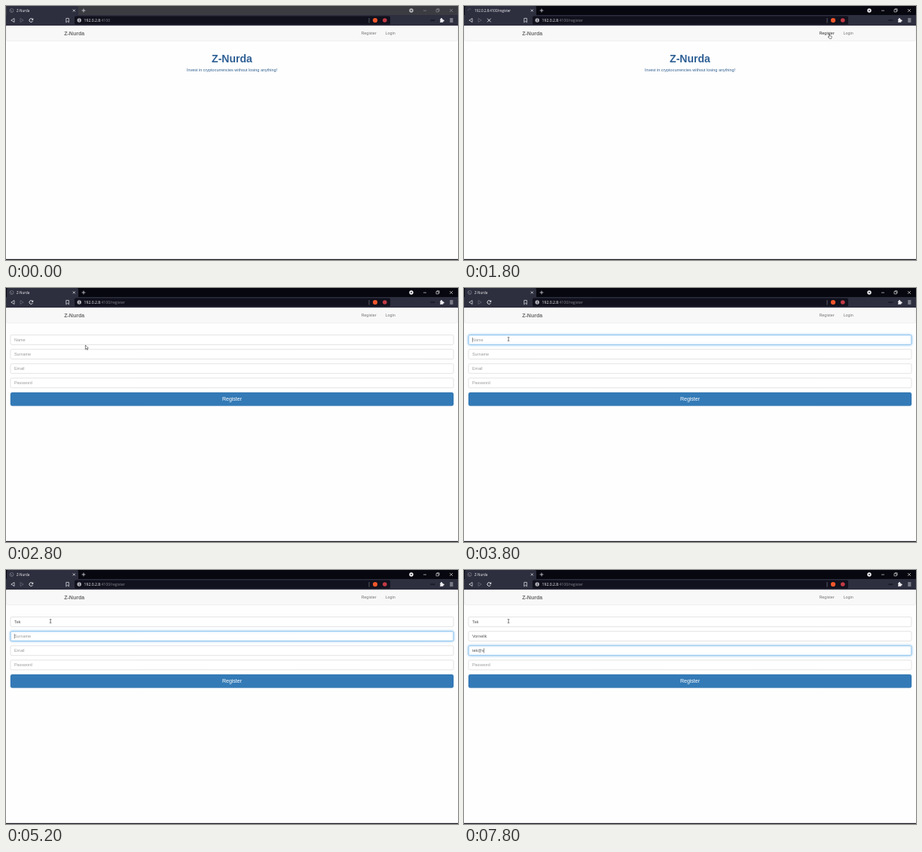
Animation of 600 by 338 pixels, one loop 8000 ms. Source, as an HTML page with a canvas:

```html
<!DOCTYPE html>
<html lang="en">
<head>
<meta charset="utf-8">
<title>Registration walkthrough</title>
<style>
html, body { margin: 0; width: 100%; height: 100%; overflow: hidden; background: #fefefe; }
canvas { display: block; width: 100vw; height: 100vh; }
</style>
</head>
<body>
<canvas id="stage" width="600" height="338"></canvas>
<script>
const ctx = document.getElementById('stage').getContext('2d');
const LOOP = 8000, TICK = 200, TAU = Math.PI * 2;
const ZOOM = 600 / 1536;
const PAGE = '"Liberation Sans", Arial, sans-serif';
const UI = '"Open Sans", "Noto Sans", sans-serif';
const BRAND = 'Z-Nurda', HOST = '192.0.2.8', PORT = ':4100', PATH = '/register';

const FIELDS = [
  { hint: 'Name', word: 'Tek', from: 4600, to: 5000, focus: 3600, blur: 5200 },
  { hint: 'Surname', word: 'Vornelik', from: 5800, to: 6800, focus: 5200, blur: 7000 },
  { hint: 'Email', word: 'tek@v', from: 7400, to: 7800, focus: 7000, blur: LOOP },
  { hint: 'Password', word: '', from: LOOP, to: LOOP + 1, focus: LOOP, blur: LOOP }
];

// time, x, y of the pointer's hot spot, shape
const POINTER = [
  [200, 497, 62, 'arrow'], [400, 484.6, 37.4, 'hand'], [2200, 410, 52, 'arrow'],
  [2400, 250, 70, 'arrow'], [2600, 140, 77, 'arrow'], [2800, 105.4, 76, 'arrow'],
  [3000, 82, 71, 'beam'], [3200, 65, 68.5, 'beam'], [3400, 59, 68, 'beam']
];

function text(str, x, y, size, color, font = PAGE, weight = 400, align = 'left') {
  ctx.font = `${weight} ${size}px ${font}`;
  ctx.textAlign = align;
  ctx.fillStyle = color;
  ctx.fillText(str, x, y);
  return ctx.measureText(str).width;
}

function rect(x, y, w, h, color) {
  ctx.fillStyle = color;
  ctx.fillRect(x, y, w, h);
}

function box(x, y, w, h, r, fill, stroke, width = ZOOM) {
  ctx.beginPath();
  ctx.roundRect(x, y, w, h, r);
  if (fill) { ctx.fillStyle = fill; ctx.fill(); }
  if (stroke) { ctx.strokeStyle = stroke; ctx.lineWidth = width; ctx.stroke(); }
}

function poly(points, { fill, stroke, width = 0.7, close = false }) {
  ctx.beginPath();
  points.forEach(([x, y]) => ctx.lineTo(x, y));
  if (close) ctx.closePath();
  if (fill) { ctx.fillStyle = fill; ctx.fill(); }
  if (stroke) { ctx.strokeStyle = stroke; ctx.lineWidth = width; ctx.stroke(); }
}

function disc(x, y, r, color) {
  ctx.beginPath();
  ctx.arc(x, y, r, 0, TAU);
  ctx.fillStyle = color;
  ctx.fill();
}

function arc(x, y, r, color, width = 0.7, from = 0, to = TAU) {
  ctx.beginPath();
  ctx.arc(x, y, r, from, to);
  ctx.strokeStyle = color;
  ctx.lineWidth = width;
  ctx.stroke();
}

function cross(x, y, r, color, width = 0.8) {
  poly([[x - r, y - r], [x + r, y + r]], { stroke: color, width });
  poly([[x + r, y - r], [x - r, y + r]], { stroke: color, width });
}

function drawTabs(active, loading) {
  const tone = active ? '#f2f2f4' : '#97989c';
  rect(0, 0, 600, 13, active ? '#07070f' : '#3b3c42');
  box(1, 0, 95, 14, [2, 2, 0, 0], '#2d2e3e');
  if (loading) {
    arc(7.5, 6, 2.2, '#6d6e7c', 0.6, 3, 5.6);
  } else {
    arc(7.5, 6, 2.5, '#8b8c96', 0.6);
    poly([[5.4, 5], [7.3, 6.2], [8, 8.2]], { stroke: '#8b8c96', width: 0.6 });
  }
  text(loading ? HOST + PORT + PATH : BRAND, 14, 7.7, 4.5, '#f4f4f6', UI, 500);
  cross(90.3, 6, 1.5, '#e8e8ec');
  rect(100.6, 5.6, 4.8, 0.8, '#d8d8de');
  rect(102.6, 3.6, 0.8, 4.8, '#d8d8de');

  disc(538, 6, 2.7, active ? '#f2f2f4' : '#b9babd');
  disc(538, 6, 0.9, '#2a2a34');
  rect(554, 5.8, 4, 0.6, tone);
  box(571, 4.7, 3.2, 3.2, 0, null, tone, 0.6);
  poly([[572, 4.6], [572, 3.8], [575.1, 3.8], [575.1, 6.9], [574.3, 6.9]], { stroke: tone, width: 0.6 });
  cross(591, 6, 2, tone, 0.6);
}

function drawToolbar(path, loading) {
  const white = '#eeeef2';
  rect(0, 12, 600, 14.3, '#2d2e3e');
  poly([[11, 16.5], [11, 21.5], [6.8, 19]], { stroke: white, close: true });
  poly([[19, 16.5], [19, 21.5], [23.2, 19]], { stroke: '#6d6e7c', close: true });
  if (loading) {
    cross(33.3, 19, 2.3, white, 0.9);
  } else {
    arc(33.3, 19, 2.4, white, 0.9, 0.4, 5.5);
    poly([[36.2, 16], [36.2, 18.7], [33.6, 18.7]], { fill: white });
  }
  poly([[79.8, 16.4], [83.4, 16.4], [83.4, 21.8], [81.6, 20.2], [79.8, 21.8]], { stroke: white, close: true });

  box(91, 13.4, 419, 11.2, 1.5, '#11111d');
  disc(97.2, 19, 2.7, '#b4b5bd');
  rect(96.8, 18.5, 0.8, 2.1, '#11111d');
  rect(96.8, 17.1, 0.8, 0.8, '#11111d');
  const w = text(HOST, 103.6, 20.8, 5.08, '#f4f4f6', UI);
  text(PORT + path, 103.6 + w, 20.8, 5.08, '#85868f', UI);
  rect(481.7, 16, 0.6, 6.5, '#8b8c96');
  disc(490, 19, 3.1, '#f2562b');
  disc(502.8, 19, 2.8, '#c23a45');

  rect(563.5, 18.2, 6, 1.8, '#1b1b28');
  box(576, 17.4, 4.3, 4.3, 0.5, white);
  disc(578, 17.1, 1.1, white);
  disc(580.7, 19.5, 1.1, white);
  disc(576, 19.8, 0.8, '#2d2e3e');
  for (let i = 0; i < 3; i++) rect(589.2, 16.6 + i * 2, 4.2, 0.8, white);
}

function drawNav(hover) {
  box(0.2, 26.6, 599.6, 19.8, 1.6, '#f8f8f8', '#e4e4e4', 0.5);
  text(BRAND, 77.2, 38.8, 18 * ZOOM, '#6c6c6c', PAGE, 700);
  text('Register', 471.4, 38.2, 14 * ZOOM, hover ? '#333' : '#777');
  text('Login', 503.4, 38.2, 14 * ZOOM, '#777');
}

function drawHome() {
  text(BRAND, 300, 75, 36 * ZOOM, '#2f6095', PAGE, 700, 'center');
  text('Invest in cryptocurrencies without losing anything!', 300, 87.3, 14 * ZOOM, '#31608f', PAGE, 400, 'center');
}

function typed({ word, from, to }, t) {
  if (t < from) return '';
  const p = Math.min(1, (t - from) / (to - from));
  return word.slice(0, Math.round(1 + (word.length - 1) * p));
}

function drawField(field, row, t) {
  const y = 62.3 + row * 49 * ZOOM, h = 34 * ZOOM;
  const focused = t >= field.focus && t < field.blur;
  ctx.save();
  if (focused) {
    ctx.shadowColor = 'rgba(102,175,233,.75)';
    ctx.shadowBlur = 8 * ZOOM;
  }
  box(6, y + 0.2, 588, h - 0.4, 4 * ZOOM, '#fff', focused ? '#66afe9' : '#c8c8c8', focused ? 0.6 : 0.5);
  ctx.restore();

  const value = typed(field, t);
  const w = text(value || field.hint, 10.95, y + 8.6, 14 * ZOOM, value ? '#555' : '#999');
  const blinkOff = (t >= 4200 && t < 4600) || t === 5600;
  if (focused && !blinkOff) rect(10.9 + (value ? w : 0), y + 3.5, 0.5, 6.4, '#333');
}

function drawForm(t) {
  FIELDS.forEach((f, i) => drawField(f, i, t));
  box(6, 139.1, 588, 17.7, 6 * ZOOM, '#337ab7', '#2e6da4');
  text('Register', 300, 150.2, 18 * ZOOM, '#fff', PAGE, 400, 'center');
}

const SHAPES = {
  arrow: [[0, 0], [0, 5.6], [1.3, 4.4], [2.2, 6.4], [3.1, 6], [2.2, 4.1], [4, 4.1]],
  hand: [[0, 0], [0.9, 0], [1, 2.2], [3.4, 2.8], [3.6, 4.2], [3, 6], [0.6, 6], [-1.4, 3.6], [-0.8, 3.2], [0, 3.8]]
};

function drawPointer(t) {
  const key = POINTER.filter(k => k[0] <= t).pop();
  if (!key) return;
  const [, x, y, shape] = key;
  ctx.save();
  ctx.translate(x, y);
  if (shape === 'beam') {
    rect(-0.3, -2.6, 0.7, 5.2, '#333');
    rect(-1.3, -2.8, 2.7, 0.5, '#444');
    rect(-1.3, 2.3, 2.7, 0.5, '#444');
  } else {
    poly(SHAPES[shape], { fill: '#fff', stroke: '#222', width: 0.55, close: true });
  }
  ctx.restore();
}

function draw(t) {
  const loading = t >= 1800 && t < 2000;
  const registering = t >= 2000;
  rect(0, 0, 600, 338, '#fefefe');
  drawTabs(t >= 1600, loading);
  drawToolbar(t >= 1800 ? PATH : '', loading);
  drawNav(t >= 1200 && t < 2200);
  if (registering) drawForm(t); else drawHome();
  rect(0, 336.8, 600, 1.2, '#15151c');
  drawPointer(t);
}

function frame() {
  draw(Math.floor(performance.now() % LOOP / TICK) * TICK);
  requestAnimationFrame(frame);
}
frame();
</script>
</body>
</html>
```
